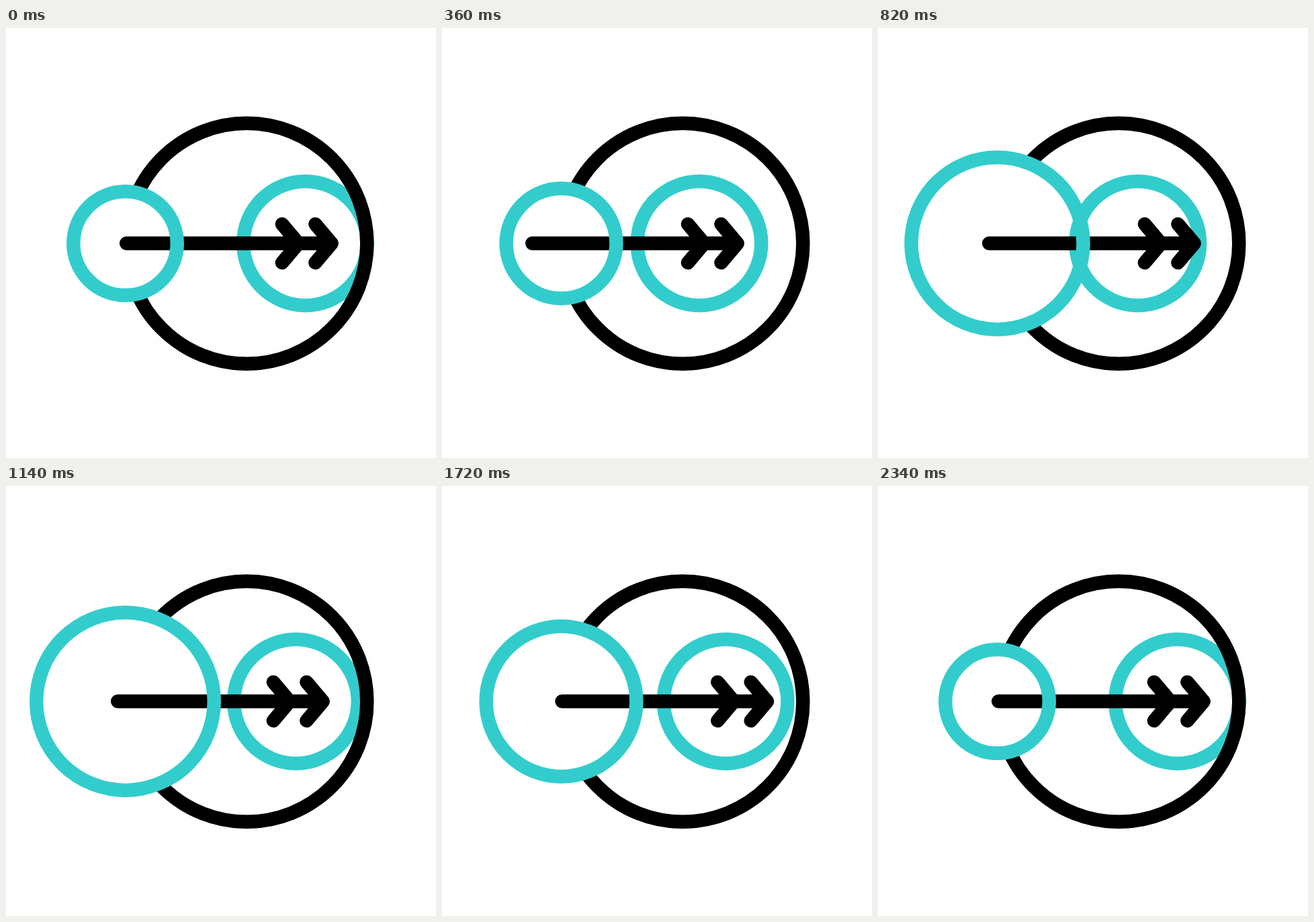
These frames come from a looping animation (640x640 px, 2.4 s). An HTML page:

```html
<!DOCTYPE html>
<html lang="en">
<head>
<meta charset="utf-8">
<title>Arrow and rings</title>
<style>
  html, body { margin: 0; width: 100%; height: 100%; overflow: hidden; background: #fff; }
  svg { display: block; width: 100%; height: 100%; }
  .line { fill: none; stroke: #000; stroke-width: 20.5; stroke-linecap: round; stroke-linejoin: round; }
  .teal { stroke: #33cccc; }
</style>
</head>
<body>
<svg viewBox="0 0 640 640">
  <defs>
    <mask id="gap" maskUnits="userSpaceOnUse" x="0" y="0" width="640" height="640">
      <rect width="640" height="640" fill="#fff"/>
      <circle id="hole" cx="177.5" cy="320.6" fill="#000"/>
    </mask>
  </defs>
  <circle id="inner" class="line teal" cy="320.6" r="92.3"/>
  <g mask="url(#gap)"><circle class="line" cx="358.3" cy="320.8" r="179"/></g>
  <g id="arrow" class="line">
    <path d="M179.2 320.6H484.5M410.9 291.9L435.2 320.6L410.9 349.3M460.4 291.9L484.7 320.6L460.4 349.3"/>
  </g>
  <circle id="left" class="line teal" cx="177.5" cy="320.6"/>
</svg>
<script>
  const LOOP = 2400;
  const EASE = 0.79;

  // Each key is [time in ms, value].
  const radiusKeys = [[0, 77.25], [1170, 132.3], [2340, 77.25]];
  const innerKeys = [[0, 445.5], [311, 382.2], [622, 426], [920, 382.2], [1244, 436.5], [1560, 382.2], [1864, 445.5]];
  const arrowKeys = [[0, 0], [311, -45.5], [622, -14], [820, -14], [1140, -13], [1480, -30], [1775, 0]];

  const get = id => document.getElementById(id);
  const hole = get("hole"), left = get("left"), inner = get("inner"), arrow = get("arrow");

  // Symmetric cubic ease: cubic-bezier(EASE, 0, 1 - EASE, 1)
  function ease(x) {
    let lo = 0, hi = 1;
    for (let i = 0; i < 24; i++) {
      const s = (lo + hi) / 2, r = 1 - s;
      const bx = 3 * r * r * s * EASE + 3 * r * s * s * (1 - EASE) + s * s * s;
      if (bx < x) lo = s; else hi = s;
    }
    return lo * lo * (3 - 2 * lo);
  }

  function valueAt(keys, t) {
    const i = keys.findIndex(k => k[0] > t);
    if (i < 0) return keys[keys.length - 1][1];
    const [t0, a] = keys[i - 1], [t1, b] = keys[i];
    return a + (b - a) * ease((t - t0) / (t1 - t0));
  }

  function draw(t) {
    const r = valueAt(radiusKeys, t);
    left.setAttribute("r", r);
    hole.setAttribute("r", r);
    inner.setAttribute("cx", valueAt(innerKeys, t));
    arrow.setAttribute("transform", `translate(${valueAt(arrowKeys, t)} 0)`);
  }

  const start = performance.now();
  function tick(now) {
    draw(Math.max(0, now - start) % LOOP);
    requestAnimationFrame(tick);
  }
  draw(0);
  requestAnimationFrame(tick);
</script>
</body>
</html>
```
